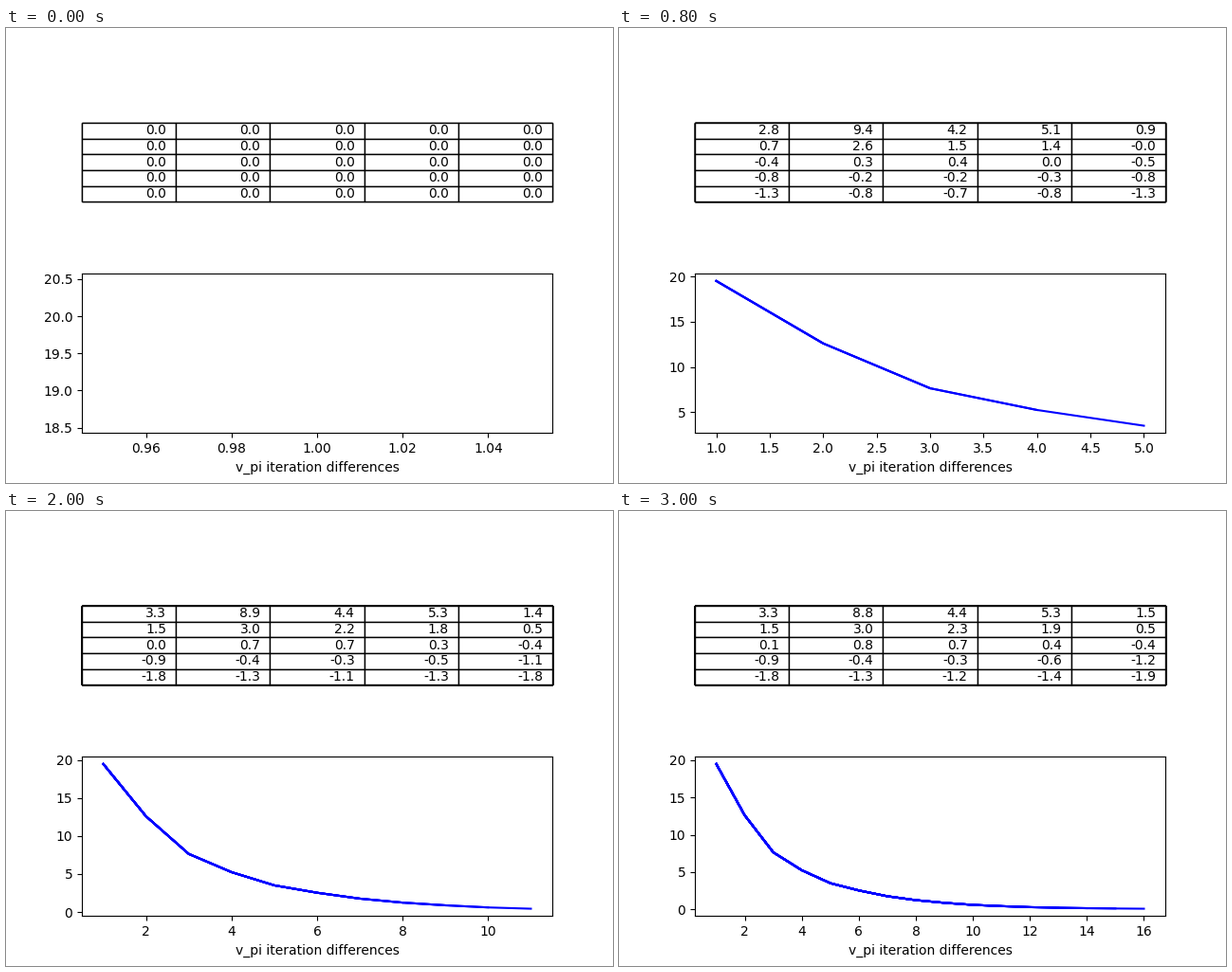
These frames come from a looping animation (640 px wide and 480 px high, 3.2 s). A matplotlib script:

```python
import numpy as np
import matplotlib.pyplot as plt
from matplotlib.animation import FuncAnimation

SIZE, FRAMES, GAMMA = 5, 16, 0.9
# start cell -> (landing cell, reward)
JUMPS = {(0, 1): ((4, 1), 10), (0, 3): ((2, 3), 5)}


def neighbour_sum(grid):
    return grid[:-2, 1:-1] + grid[2:, 1:-1] + grid[1:-1, :-2] + grid[1:-1, 2:]


WALLS = neighbour_sum(np.pad(np.zeros((SIZE, SIZE)), 1, constant_values=1))


def sweep(v):
    """One synchronous evaluation step of the uniform random policy."""
    new = 0.25 * (GAMMA * neighbour_sum(np.pad(v, 1, mode="edge")) - WALLS)
    for cell, (landing, reward) in JUMPS.items():
        new[cell] = reward + GAMMA * v[landing]
    return new


values = [np.zeros((SIZE, SIZE))]
for _ in range(FRAMES):
    values.append(sweep(values[-1]))
diffs = [np.abs(b - a).sum() for a, b in zip(values, values[1:])]

fig, (ax_table, ax_plot) = plt.subplots(2, 1, figsize=(6.4, 4.8), dpi=100)
ax_table.axis("off")
ax_plot.set_xlabel("v_pi iteration differences")


def add_table(text):
    return ax_table.table(cellText=[[text] * SIZE] * SIZE, loc="center")


# Tables and lines pile up over time, which darkens their soft edges.
layers = [add_table("") for _ in range(FRAMES)]
top = add_table("0.0")
lines = [ax_plot.plot(range(1, n + 1), diffs[:n], "b")[0]
         for n in range(1, FRAMES + 1)]


def update(i):
    for k in range(FRAMES):
        layers[k].set_visible(k <= i)
        lines[k].set_visible(k <= i)
    for cell, value in np.ndenumerate(values[i]):
        top[cell].get_text().set_text(f"{value:.1f}")
    ax_plot.relim(visible_only=True)
    ax_plot.autoscale_view()


anim = FuncAnimation(fig, update, frames=FRAMES, interval=200,
                     repeat=True, repeat_delay=0)
plt.show()
```
